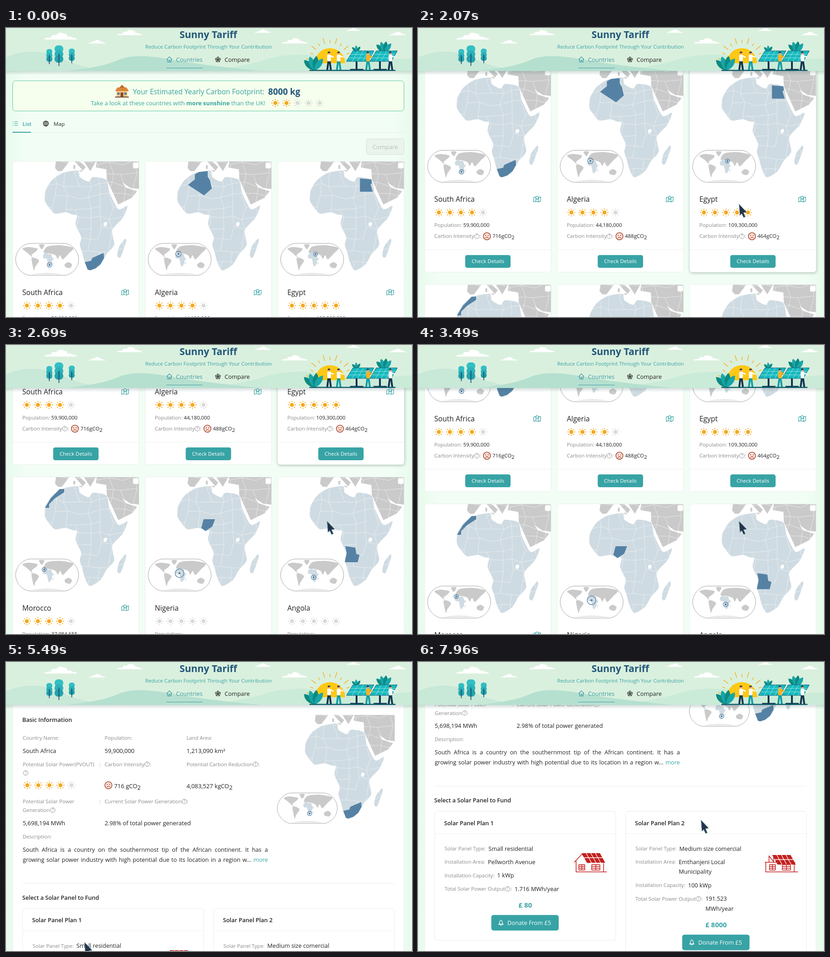
An HTML page that plays this animation: 886x632 px, repeating every 8 s.

```html
<!DOCTYPE html>
<html lang="en">
<head>
<meta charset="utf-8">
<title>Carbon footprint dashboard</title>
<style>
html, body { margin: 0; width: 100%; height: 100%; overflow: hidden; background: #f2fef5; }
svg { display: block; }
svg, div { font-family: "Open Sans", "Noto Sans", sans-serif; }
div { font-size: 12.7px; line-height: 22px; color: #222; text-align-last: justify; white-space: nowrap; }
</style>
</head>
<body>
<svg id="stage" width="886" height="632"></svg>
<script>
const TEAL = '#38a3a5', NAVY = '#22577a', INK = '#222', GRAY = '#8a8a8a', GOLD = '#f5a81c', RED = '#c4201f';
const LIGHT = '#cfdbe2', LAND = '#cacaca', MARK = '#5582a4', DARK = '#12344f';

// ---- drawing helpers ----
const range = n => [...Array(n).keys()];
const each = (list, f) => list.map(f).join('');
const medium = ' font-weight="500"', semi = ' font-weight="600"', bold = ' font-weight="700"', mid = ' text-anchor="middle"';
const text = (x, y, s, size = 11.3, fill = GRAY, more = '') =>
  `<text x="${x}" y="${y}" font-size="${size}" fill="${fill}"${more}>${s}</text>`;
const rect = (x, y, w, h, fill, more = '') =>
  `<rect x="${x}" y="${y}" width="${w}" height="${h}" fill="${fill}" ${more}/>`;
const path = (d, fill, more = '') => `<path d="${d}" fill="${fill}" ${more}/>`;
const line = (d, stroke, width = 1, more = '') =>
  path(d, 'none', `stroke="${stroke}" stroke-width="${width}" stroke-linejoin="round" ${more}`);
const dot = (x, y, r, fill, more = '') => `<circle cx="${x}" cy="${y}" r="${r}" fill="${fill}" ${more}/>`;
const use = (id, x = 0, y = 0, more = '') => `<use href="#${id}" x="${x}" y="${y}" ${more}/>`;
const suns = (x, y, n) => each(range(5), i => use('sun', x + i * 24.1, y, `color="${i < n ? GOLD : '#d8dad8'}"`));
const sub = s => `${s}<tspan dy="3">2</tspan>`;

const pen = document.createElement('canvas').getContext('2d');
const width = s => {
  pen.font = '11.3px "Open Sans", "Noto Sans", sans-serif';
  return pen.measureText(s).width;
};

// A gray label with an optional help mark; `then` draws what follows the colon.
const label = (x, y, name, help, then = () => '') => {
  const end = x + width(name) + (help ? 12 : 0);
  return text(x, y, name) + (help ? use('help', end - 6, y - 4) : '') + text(end, y, ':') + then(end + 3);
};

// ---- maps ----
const points = s => s.split(' ').map(p => p.split(',').map(Number));
const smooth = s => {
  const p = points(s), n = p.length, at = i => p[(i + n) % n];
  const handle = (i, j, dir) => at(i).map((v, k) => v + dir * (at(j + 1)[k] - at(j - 1)[k]) / 8);
  return `M${p[0]}` + each(range(n), i => `C${handle(i, i, 1)} ${handle(i + 1, i + 1, -1)} ${at(i + 1)}`) + 'Z';
};

let seed = 11;
const random = () => (seed = seed * 16807 % 2147483647) / 2147483647;
const jitter = (v, amount) => v + (random() - .5) * amount;

// Borders: a loose grid of wobbly cells, clipped to the land.
const borders = () => {
  const nodes = range(11).map(r => range(10).map(c => [jitter(80 + c * 25, 13), jitter(295 + r * 24, 13)]));
  return each(nodes, (row, r) => each(row, (p, c) =>
    (c && random() < .85 ? `M${row[c - 1]}L${p}` : '') + (r && random() < .85 ? `M${nodes[r - 1][c]}L${p}` : '')));
};

const africa = smooth('124,317 157,312 161,326 180,336 190,326 219,332 226,360 245,396 265,389 255,415 232,442 236,474 219,495 206,517 183,530 172,512 166,490 161,474 164,457 152,430 155,410 145,408 130,403 107,406 95,394 85,378 86,357 100,333')
  + smooth('260,461 262,468 250,501 243,498 247,478');
const eurasia = 'M109,292 107,306 113,313 122,313 138,292Z M150,292 168,312 174,304 161,292Z M170,292 184,313 196,292Z ' +
  'M198,292 196,305 219,309 220,331 245,386 275,371 286,357 262,349 254,338 272,350 290,352V292Z M158,311h8v4z M147,300h4v8h-4z';
const world = each([
  '36,483 48,479 68,482 66,488 56,496 58,502 47,492',
  '56,503 64,503 72,509 64,522 61,530 57,514',
  '82,491 90,478 118,475 147,481 136,494 124,506 118,497 113,505 108,497 97,493',
  '128,517 136,512 144,517 140,525 130,523',
  '72,474 84,474 78,484'], smooth);

// name, suns, population, carbon intensity, ring radius, outline
const countries = [
  ['South Africa', 4, '59,900,000', 716, 5, '172,512 186,509 188,503 199,498 213,492 214,503 206,517 195,526 183,530 178,528'],
  ['Algeria', 4, '44,180,000', 488, 6, '108,343 123,331 123,320 132,315 151,313 151,325 156,333 160,351 143,366'],
  ['Egypt', 5, '109,300,000', 464, 4.5, '194,329 219,331 220,340 217,342 222,358 194,358'],
  ['Morocco', 4, '37,984,655', 0, 4.5, '117,318 127,318 127,325 107,338 94,351 94,359 85,359 98,338'],
  ['Nigeria', 0, '-', 0, 9.5, '137,403 142,384 167,384 161,400 146,410'],
  ['Angola', 0, '-', 0, 5, '162,443 184,446 186,460 193,462 189,478 161,478 165,458']
];

const middle = values => (Math.min(...values) + Math.max(...values)) / 2;
const countryMap = ([, , , , r, outline]) => {
  const p = points(outline);
  const x = 87 + (middle(p.map(q => q[0])) - 134) * .135, y = 494 + (middle(p.map(q => q[1])) - 339) * .14;
  return use('map') + path(`M${outline}Z`, MARK) + use('globe') +
    dot(x, y, r, 'none', `stroke="${MARK}" stroke-width="1.4"`) + dot(x, y, 2.2, MARK);
};

const defs = `<defs>
  <linearGradient id="page"><stop offset="0" stop-color="#e8faed"/><stop offset=".05" stop-color="#f2fef5"/>
    <stop offset=".95" stop-color="#f2fef5"/><stop offset="1" stop-color="#e8faed"/></linearGradient>
  <linearGradient id="fade" x2="0" y2="1"><stop stop-color="#355" stop-opacity=".2"/><stop offset="1" stop-color="#355" stop-opacity="0"/></linearGradient>
  <filter id="blur" x="-10%" y="-10%" width="120%" height="120%"><feGaussianBlur stdDeviation="3"/></filter>
  <clipPath id="land">${path(africa + eurasia, '#000')}</clipPath>
  <g id="sun">${dot(0, 0, 4.3, 'currentColor')}<circle r="7.4" fill="none" stroke="currentColor" stroke-width="2.6" pathLength="80" stroke-dasharray="2.8 7.2" stroke-dashoffset="1.4"/></g>
  <g id="face">${dot(0, 0, 7.8, '#fbe3dc', 'stroke="#a5402a" stroke-width="1.5"')}${dot(-2.8, -1.8, 1.1, '#a5402a')}${dot(2.8, -1.8, 1.1, '#a5402a')}${line('M-3.3,4.2Q0,-.4 3.3,4.2', '#a5402a', 1.3)}</g>
  <g id="help">${dot(0, 0, 5.2, 'none', `stroke="${GRAY}" stroke-width=".9"`)}${text(0, 3, '?', 8.5, GRAY, mid)}</g>
  <g id="fold">${line('M4.5,2 0,3.5V13L4.5,11.5 10.5,13 15,11.5V2L10.5,3.5 M4.5,4V11.5 M10.5,4V13 M7.5,8Q4,4 5,2Q7.5,-1.5 10,2Q11,4 7.5,8Z', TEAL, 1.2)}</g>
  <g id="rocket">${line('M0,-6Q4,-3 3,3H-3Q-4,-3 0,-6Z M-3,0 -5,4H5L3,0 M0,4V7', '#fff', 1.1)}</g>
  <g id="map">${path(eurasia, LAND)}${path(africa, LIGHT)}${line(borders(), '#f1f5f7', .7, 'clip-path="url(#land)"')}${path('M213,426l6,-2 2,4-3,6-5,-1z', '#fff')}</g>
  <g id="globe">
    ${path('M52,471H128C146,473 158.5,490 158.5,506S146,539 128,541H52C34,539 21,522 21,506S34,473 52,471Z', '#fff', 'stroke="#999" stroke-width=".9"')}
    ${path(world, LAND)}${path(africa, LIGHT, 'transform="translate(69 448.5) scale(.135 .138)"')}${path('M52,539Q90,532 128,539Z', '#e6e6e6')}
  </g>
</defs>`;

// ---- list page ----
const card = (c, i) => {
  const [name, n, people, carbon] = c, x = 35.5;
  return `<g transform="translate(${i % 3 * 289.2} ${i > 2 ? 473 : 0})">
    ${rect(15, 293, 276, 446, '#1a3a2c', `id="shade${i}" rx="6" filter="url(#blur)" opacity="0"`)}
    ${rect(14.5, 291.5, 276, 446, '#fff', 'rx="6" stroke="#eaf0ec"')}
    ${countryMap(c)}
    ${rect(277, 294, 12.5, 13, '#fff', 'rx="3" stroke="#ddd" stroke-width=".7"')}
    ${text(x, 584, name, 15.6, INK, medium)}${n ? use('fold', 252.5, 571) : ''}
    ${suns(45.5, 607, n)}
    ${label(x, 638.5, 'Population', false, end => text(end + 3, 638.5, people, 11.3, INK))}
    ${label(x, 663, 'Carbon Intensity', true, end => carbon ?
      use('face', end + 13, 659) + text(end + 25, 663, sub(carbon + 'gCO'), 11.4, INK) : text(end + 6, 663, '-', 11.4, INK))}
    ${line('M15,688.5H290', '#f0f0f0')}
    ${rect(103, 700, 99, 28, TEAL, `id="button${i}" rx="4.5"`)}${text(152.5, 718, 'Check Details', 11.4, '#fff', mid)}
  </g>`;
};

const cottage = path('M238,138 243,130 263,130 268,138Z', '#d9853b') + path('M247,131 253,124 260,131Z', '#c4682f') +
  rect(241, 138, 24, 12, '#f3c98b') + rect(250, 141, 6, 10, '#8a4b2a') +
  each([243, 258], x => rect(x, 141, 5, 5, '#5f7f8c')) + rect(238, 150, 30, 2, '#6b4a3a');

const meridians = dot(87, 209, 5.6, 'none', `stroke="${INK}" stroke-width="1.2"`) +
  line('M81.5,209H92.5 M82.5,206H91.5 M82.5,212H91.5 M87,203.5V214.5Q81,209 87,203.5Q93,209 87,214.5', INK, .8);

const list = `<g id="list">
  ${rect(14.5, 115.5, 854, 66, '#f6ffed', 'rx="6" stroke="#5cc9a7"')}${cottage}
  ${text(277, 145, 'Your Estimated Yearly Carbon Footprint:', 15.4, TEAL)}${text(572, 146, '8000 kg', 18.8, NAVY, bold)}
  ${text(185, 168.5, 'Take a look at these countries with <tspan font-weight="700">more sunshine</tspan> than the UK!', 12.8, TEAL)}
  ${suns(588, 164, 2)}
  ${line(each([205, 209, 213], y => `M14.5,${y}h1.5 M18,${y}h8`), TEAL, 1.1)}
  ${text(36, 213.5, 'List', 11.5, TEAL, semi)}${meridians}${text(104, 213.5, 'Map', 11.6, INK)}
  ${line('M14,228.5H869', '#e6efe9')}${rect(14, 227, 40.5, 2, TEAL)}
  ${rect(786.5, 242.5, 82, 34, '#eaf4ed', 'rx="5" stroke="#d5dcd7"')}${text(827.5, 265, 'Compare', 13, '#b9beba', mid)}
  ${each(countries, card)}
</g>`;

// ---- detail page ----
const value = (x, y, s) => text(x, y, s, 12.9, INK);
const column = i => 36.5 + 178.7 * i;
const wrapped = (x, y, first, last) => text(x, y, first) + text(x + 167.5, y, ':') + text(x, y + 19, last) +
  use('help', x + width(last) + 6.5, y + 15);

const roofHouse = (x, top, outline) => {
  const slope = (i, y) => `${x + 16 + i * 10 + y * .55},${top + y}`;
  return line(outline, RED, 1.5) + path(`M${slope(0, 0)}L${slope(4, 0)} ${slope(4, 21)} ${slope(0, 21)}Z`, RED) +
    line(each([1, 2, 3], i => `M${slope(i, 0)}L${slope(i, 21)}`) + `M${slope(0, 10)}L${slope(4, 10)}`, '#fff', 1.3) +
    each([[10, 13], [38, 18]], ([dx, w]) => line(each(range(4), i => `M${x + dx},${643 + i * 4}h${w}`) +
      `M${x + dx},643v12 M${x + dx + w / 2},643v12 M${x + dx + w},643v12`, RED, 1.4));
};

const plan = (n, x, icon, price, rows) => {
  let y = 612 - 29.4, body = '';
  for (const [name, lines, help] of rows) {
    y += 29.4;
    const top = y;
    body += label(x + 22, top, name, help, end => each(lines, (s, i) => text(end + 6, top + .5 + i * 21.5, s, 12.7, INK)));
    y += (lines.length - 1) * 21.5;
  }
  return rect(x + .5, 526.5, 395, y - 418, '#fff', 'rx="6" stroke="#ececec"') + line(`M${x},575.5h395`, '#f0f0f0') +
    text(x + 21, 556.5, 'Solar Panel Plan ' + n, 12.6, INK, semi) + icon + body +
    text(x + 198, y + 36.5, price, 15, TEAL, bold + mid) + rect(x + 124, y + 53, 147, 34, TEAL, 'rx="5"') +
    use('rocket', x + 145, y + 70) + text(x + 159, y + 75, 'Donate From £5', 12.7, '#fff');
};

const detail = `${rect(14.5, 60, 854, 600, '#fff', 'stroke="#e9f0eb"')}<g id="info">
  ${text(35.5, 118, 'Basic Information', 12.7, INK, semi)}
  ${each([['Country Name', 'South Africa'], ['Population', '59,900,000'], ['Land Area', '1,213,090 km²']],
    ([name, v], i) => label(column(i), 157, name) + value(column(i), 186, v))}
  ${wrapped(36.5, 215, 'Potential Solar Power(PVOUT)', '')}${suns(46.5, 257, 4)}
  ${label(column(1), 215, 'Carbon Intensity', true)}${use('face', 223.5, 257)}${value(236, 263, sub('716 gCO'))}
  ${label(column(2), 215, 'Potential Carbon Reduction', true)}${value(column(2), 263, sub('4,083,527 kgCO'))}
  ${wrapped(36.5, 296.5, 'Potential Solar Power', 'Generation')}${value(36.5, 344, '5,698,194 MWh')}
  ${label(column(1), 296.5, 'Current Solar Power Generation', true)}${value(column(1), 344, '2.98% of total power generated')}
  ${label(36.5, 373, 'Description')}
  <foreignObject x="36.5" y="386" width="535" height="48"><div>South Africa is a country on the southernmost tip of the African continent. It has a<br>growing solar power industry with high potential due to its location in a region w... <span style="color:${TEAL}">more</span></div></foreignObject>
  <g transform="translate(572 -175) scale(.953)">${countryMap(countries[0])}</g>
  ${line('M36,471.5H848', '#ececec')}
  ${text(35.5, 507, 'Select a Solar Panel to Fund', 12.6, INK, semi)}
  ${plan(1, 36, roofHouse(341, 618, 'M341,638 358,620 373,640 M345,635V659H412 M405,640V659'), '£ 80', [
    ['Solar Panel Type', ['Small residential']],
    ['Installation Area', ['Pellworth Avenue']],
    ['Installation Capacity', ['1 kWp']],
    ['Total Solar Power Output', ['1.716 MWh/year'], true]])}
  ${plan(2, 452.5, roofHouse(757, 622, 'M757,638H823 M759,638V659H829 M821,639V659 M766,638V624L776,637V624'), '£ 8000', [
    ['Solar Panel Type', ['Medium size comercial']],
    ['Installation Area', ['Emthanjeni Local', 'Municipality']],
    ['Installation Capacity', ['100 kWp']],
    ['Total Solar Power Output', ['191.523', 'MWh/year'], true]])}
</g>`;

// ---- header ----
const cloud = ([x, y, w]) => path('M0,15Q2,10 14,11Q16,3 26,6Q32,-3 42,2Q50,2 51,9Q58,7 61,11Q70,11 71,15Z', '#fff',
  `transform="translate(${x} ${y}) scale(${w / 71})"`);
const tree = ([x, top, w, h]) => each(['#33bfc4', '#2bb3ba', '#23a3ad'], (fill, i) =>
  rect(x - w / 2, top + i * h * .24, w, h * .36, fill, `rx="${w * .4}"`)) + line(`M${x},${top + h * .4}V${top + h}`, '#173f5f', 1.5);
const leaves = (x, y, h, n) => each(range(n), i => path(`M0,0C${-h * .3},${-h * .4} ${-h * .2},${-h * .8} 0,${-h}C${h * .2},${-h * .8} ${h * .3},${-h * .4} 0,0Z`,
  i % 2 ? '#17a5a8' : '#0d8a80', `transform="translate(${x} ${y}) rotate(${-45 + 80 * i / (n - 1)})"`));
const panel = x => line(`M${x + 22},73V92 M${x + 8},91.5h29`, DARK, 4) +
  path(`M${x + 14},50h46l-13,23H${x}Z`, '#17b9bd', 'stroke="#0d5f7a"') +
  line(each([1, 2, 3], i => `M${x + 14 + i * 11.5},50l-13,23`) + each([1, 2], i => `M${x + 14 - i * 4.5},${50 + i * 7.7}h46`), '#a6eeee', .8);
const person = ([x, shirt, legs]) => line(`M${x - 1},70l-3,22 M${x + 1},70l3,22`, legs, 4) +
  rect(x - 4, 58, 8, 15, shirt, 'rx="3"') + line(`M${x + 3},61l7,3`, shirt, 2.5) +
  dot(x, 55, 3, '#e9a37c') + path(`M${x - 3},55a3,3 0 0 1 6,-1z`, DARK);
const rays = each(range(11), i => {
  const a = Math.PI * (1 + (i + .3) / 10.6), at = r => [707 + r * Math.cos(a), 72 + r * Math.sin(a)];
  return `M${at(39)}L${at(i % 2 ? 46 : 52)}`;
});
const web = each([3, 6], r => 'M' + range(5).map(i => {
  const a = (i * .4 - .5) * Math.PI;
  return [462.5 + r * Math.cos(a), 69 + r * Math.sin(a)];
}).join('L') + 'Z') + 'M462.5,63V69L468,67 M459,74 462.5,69 466,74 M462.5,69 457,67';

const header = `<g>
  ${rect(0, 94, 886, 9, 'url(#fade)')}${rect(0, 0, 886, 94, '#daf0de')}
  ${path('M0,64Q60,38 120,66T250,94H0Z', '#c8e8d8')}
  ${path('M430,94Q520,84 570,68T700,62T886,66V94Z', '#cbebd9')}
  ${path('M130,94Q210,86 245,70T355,68T560,94Z', '#b5e0d0')}
  ${each([[83, 10, 72], [180, 26, 37], [243, 4, 55], [543, 3, 35], [602, 22, 56], [743, 0, 30], [836, 8, 37]], cloud)}
  ${each([[94.5, 46, 13, 33], [115.5, 38, 19, 45], [143.5, 45, 13, 32]], tree)}
  ${path('M674,77A33,33 0 1 1 740,77Z', '#ffc814')}${line(rays, '#f7b52c', 1.6)}
  ${leaves(673, 93, 32, 4)}${leaves(826, 54, 25, 4)}${leaves(765, 52, 14, 3)}
  ${panel(743)}${panel(794)}
  ${each([[705, '#fff', DARK], [726, '#fff', '#149ea3'], [790, '#ffb21e', '#149ea3'], [839, '#fff', DARK]], person)}
  ${rect(662, 91.5, 188, 2.5, '#12606e')}
  ${text(441.5, 21.5, 'Sunny Tariff', 21, NAVY, bold + mid)}
  ${text(442, 45, 'Reduce Carbon Footprint Through Your Contribution', 11.3, TEAL, mid)}
  ${line('M350.5,69 356.5,63 362.5,69 M352.5,67.5V74.5H360.5V67.5 M355.5,74V70.5H358V74', '#4199a5', 1.1)}
  ${text(371, 73.5, 'Countries', 12.8, '#4199a5')}${line('M350,87.5H429', '#4199a5', 1.2)}
  ${line(web, INK)}${text(477, 73.5, 'Compare', 12.8, INK)}
</g>`;

const pointer = `<g id="cursor" stroke="#8fb3bf">
  ${path('M0,0 17,18 10,19 14,28 10,29.5 6,21 2,25Z', '#22344a', 'id="arrow"')}
  ${path('M-2,1Q0,-2 2,1V7Q4,6 5,8Q7,7 8,9Q11,8 12,11V18L9,24H0L-6,14Q-7,10 -4,11L-2,13Z', '#22344a', 'id="hand"')}
</g>`;

const $ = id => document.getElementById(id);
$('stage').innerHTML = defs + rect(0, 0, 886, 632, 'url(#page)') + list + `<g id="detail">${detail}</g>` + header + pointer;

// ---- motion ----
const ease = (p, k = 2) => p ** k / (p ** k + (1 - p) ** k);

// Each move: start, time of last step, number of steps, end value, easing power.
const track = (t, value, moves) => {
  for (const [a, b, n, to, k] of moves) {
    if (t < a) break;
    const step = Math.floor((t - a + 15) / (b - a) * (n - 1)) + 1;
    value += (to - value) * ease(Math.min(1, step / n), k);
  }
  return value;
};
const show = (id, on) => $(id).setAttribute('display', on ? 'inline' : 'none');
const shift = (id, x, y) => $(id).setAttribute('transform', `translate(${x} ${y})`);

function draw(t) {
  const onDetail = t >= 5210, overButton = t >= 4270 && !onDetail;
  show('list', !onDetail);
  show('detail', onDetail);
  shift('list', 0, -track(t, 0, [[1130, 1610, 7, 190.5, 1.65], [2070, 2690, 9, 476, 1.46], [3350, 3950, 10, 95]]));
  shift('info', 0, -track(t, -12.5, [[6740, 6890, 3, 83, 2.74], [7090, 7230, 3, 178], [7890, 7960, 2, 200, 2.5]]));

  $('shade2').setAttribute('opacity', track(t, 0, [[200, 340, 3, .36], [3350, 3500, 3, 0]]));
  $('shade0').setAttribute('opacity', track(t, 0, [[3990, 4130, 3, .36]]));
  $('button0').setAttribute('fill', overButton ? '#5fb3b3' : TEAL);

  show('cursor', t >= 730);
  show('arrow', !overButton);
  show('hand', overButton);
  shift('cursor',
    track(t, 700.5, [[3600, 4130, 8, 219], [4200, 4480, 5, 162], [5490, 6010, 8, 617.5]]),
    track(t, 385, [[3600, 4130, 8, 591], [4200, 4480, 5, 618], [5490, 6010, 8, 345.5]]));
}

const start = performance.now();
(function loop() {
  draw((performance.now() - start) % 8000);
  requestAnimationFrame(loop);
})();
</script>
</body>
</html>
```
